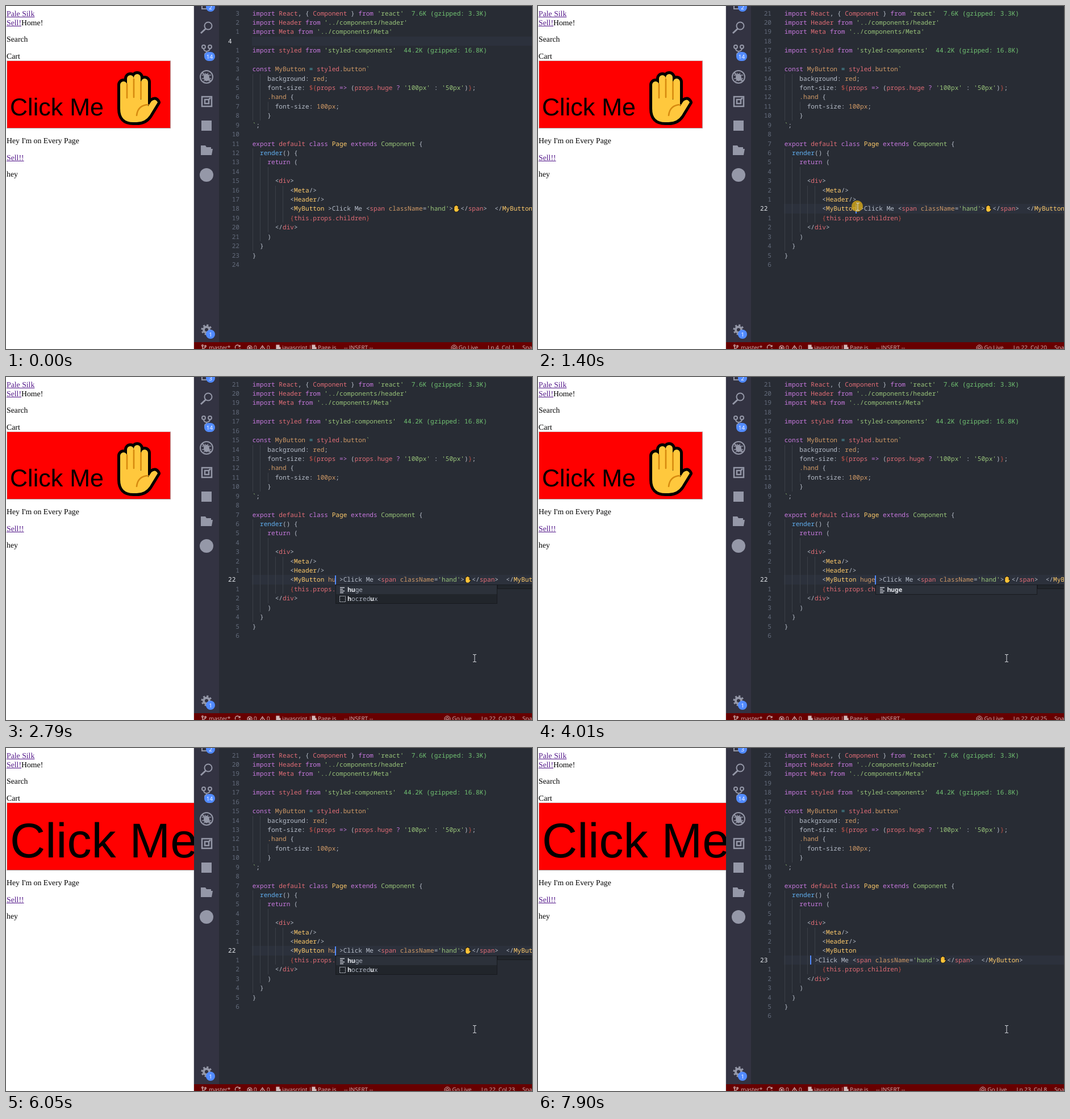
Recreate the animation shown at these times as an HTML page. Size 926x605 px, loop 8 s.

```html
<!DOCTYPE html>
<html lang="en">
<head>
<meta charset="utf-8">
<title>Styled button demo</title>
<style>
html, body { margin: 0; width: 100%; height: 100%; overflow: hidden; background: #282c34; }
body { position: relative; text-rendering: geometricPrecision; }
body > *, #page > *, #status > * { position: absolute; white-space: pre; }

#page { left: 0; top: 0; width: 331px; height: 605px; overflow: hidden; background: linear-gradient(90deg, #fff 329px, #e8e8ea 330px); font: 13.78px/16px "Liberation Serif", serif; color: #000; }
#page > * { left: 1px; }
u { color: #551a8b; }
#button { top: 96px; width: 287px; height: 118px; border: 1px solid; border-color: #d0c4c4 #a99 #a99 #d0c4c4; background: red; }
#button svg { position: absolute; left: 0; top: 0; width: 100%; height: 100%; }
#label { font-family: "Liberation Sans", Arial, sans-serif; }

#side { left: 331px; top: 0; }
.badge { font: 10px "Open Sans", sans-serif; fill: #fff; text-anchor: middle; }

#code, #pop { font: 500 11.11px/16.43px "Noto Sans Mono", monospace; }
#code { left: 375px; top: 4.6px; width: 551px; height: 588px; overflow: hidden; color: #b6bdc9; }
.row { position: relative; height: 16.43px; padding-left: 58.7px; }
.row.now::before { content: ""; position: absolute; left: 58px; right: 0; top: 0; bottom: 0; background: #2c313c; }
.row span { position: relative; top: 1px; }
.row .num { position: absolute; right: 515px; color: #636b7b; }
.now .num { right: auto; left: 16px; color: #e4e7ec; }
.row .guide { top: 0; display: inline-block; height: 100%; vertical-align: top; background: repeating-linear-gradient(90deg, #3b4048 0 1px, transparent 1px 13.333px); }
.row svg { position: relative; top: 1px; display: inline-block; width: 13.333px; height: 12.5px; vertical-align: -2px; }
.p { color: #c678dd } .r { color: #e06c75 } .g { color: #98c379 } .s { color: #72c472 }
.o { color: #d19a66 } .y { color: #ffcb6b } .b { color: #be5046 } .u { color: #61afef } .c { color: #56b6c2 }
.row .hl { background: #3e4451; }
#caret { top: 0; width: 2px; height: 16px; background: #528bff; }

#pop { top: 366px; width: 283px; background: #21252b; border: 1px solid #181a1f; color: #abb2bf; }
#pop div { position: relative; height: 16px; line-height: 17px; padding-left: 20px; }
#pop div:first-child { background: #2c313a; }
#pop b { color: #e6e9ef; }
#pop svg { position: absolute; left: 5px; top: 2px; }
#pop i { position: absolute; left: 284px; top: -1px; width: 400px; height: 6px; background: #21252b; border: 1px solid #181a1f; }

#status { left: 331px; top: 593px; width: 595px; height: 12px; overflow: hidden; background: #680000; color: #d2b9b9; font: 10px/16px "Open Sans", sans-serif; }
#status > * { top: 1px; }
#status svg { left: 1px; top: -1px; }
#right { right: 30px; display: flex; }
#right svg { position: static; margin: 3px 2px 0 0; }
#live { margin-right: 17px; }
#mouse { left: -15px; top: -15px; }
</style>
</head>
<body>
<svg width="0" height="0">
  <defs>
    <path id="fingers" d="M11 24V60M23 13V60M35 11V60M48 19V60" fill="none" stroke-linecap="round"/>
    <path id="palm" d="M5 50H54V62L60 53Q67 47 71 55L57 78Q49 90 34 90H28Q5 90 5 66Z" stroke-linejoin="round"/>
    <symbol id="hand" viewBox="0 0 76 95">
      <use href="#fingers" stroke="#000" stroke-width="22"/>
      <use href="#palm" stroke="#000" stroke-width="10"/>
      <use href="#fingers" stroke="#ffc83d" stroke-width="12"/>
      <use href="#palm" fill="#ffc83d"/>
      <path d="M17 23V47M29 14V46M41.5 19V48M54 59Q36 60 34 78" fill="none" stroke="#d68a10" stroke-width="2.6" stroke-linecap="round"/>
    </symbol>
  </defs>
</svg>

<div id="page">
  <u style="top:6px">Pale Silk</u>
  <span style="top:22px"><u>Sell!</u>Home!</span>
  <span style="top:51px">Search</span>
  <span style="top:81px">Cart</span>
  <div id="button"><svg><text id="label" x="5" y="96">Click Me</text><use id="wave" href="#hand" x="194" y="18" width="76" height="95"/></svg></div>
  <span style="top:230px">Hey I'm on Every Page</span>
  <u style="top:260px">Sell!!</u>
  <span style="top:289px">hey</span>
</div>

<svg id="side" width="44" height="593" viewBox="-1 0 44 593" fill="none" stroke="#9598a8" stroke-width="2">
  <rect x="-1" width="44" height="593" fill="#333342" stroke="none"/>
  <path d="M13 0V5H24V0"/>
  <circle cx="24" cy="35" r="6.5"/><path d="M19.500 40L11 48" stroke-width="3"/>
  <circle cx="16" cy="72" r="3"/><circle cx="27" cy="72" r="3"/><circle cx="21" cy="86" r="3"/>
  <path d="M16 75Q16 79 21 80V83M27 75Q27 79 21 80"/>
  <circle cx="21" cy="125" r="11"/>
  <ellipse cx="21" cy="126" rx="4" ry="5.500" fill="#9598a8"/>
  <path d="M13 122H29M13 128H29M16 133L18 130M26 133L24 130M18 118L20 121M24 118L22 121" stroke-width="1.300"/>
  <path d="M13 117L29 133"/>
  <path d="M13 160H30V177H13Z" stroke-width="2.500"/>
  <path d="M18 165H25V172H18ZM25 165L28 162" stroke-width="2.500"/>
  <g fill="#9598a8" stroke="none">
    <rect x="12" y="202" width="18" height="18"/>
    <path d="M11 246H19L21 249H29V252H32L30 263H11Z"/>
    <circle cx="21" cy="298" r="12"/>
  </g>
  <circle cx="21" cy="571" r="5" stroke-width="4"/>
  <circle cx="21" cy="571" r="8" stroke-width="3" stroke-dasharray="3.140 3.140"/>
  <g class="badge" stroke="none">
    <circle cx="28" cy="2" r="8" fill="#528bff"/><text id="unsaved" x="28" y="6">2</text>
    <g id="changes"><rect x="17" y="81" width="19" height="16" rx="8" fill="#528bff"/><text x="26.500" y="93">14</text></g>
    <g id="clock"><circle cx="28" cy="89" r="8" fill="#528bff"/><circle cx="28" cy="89" r="4.500" fill="none" stroke="#fff" stroke-width="1.300"/><path d="M28 86V89.500H31" fill="none" stroke="#fff"/></g>
    <circle cx="28" cy="579" r="8" fill="#528bff"/><text x="28" y="583">1</text>
  </g>
</svg>

<div id="code"></div>
<div id="caret"></div>
<div id="pop"></div>

<div id="status">
  <svg width="300" height="14" fill="none" stroke="#d2b9b9" stroke-width="1.200">
    <circle cx="14" cy="7" r="1.400"/><circle cx="19" cy="8" r="1.400"/><path d="M14 8V13M19 9Q19 12 14 12"/>
    <path d="M72 12A4 4 0 0 1 79 8M80 6V9H77M80 12A4 4 0 0 1 76 15"/>
    <circle cx="97" cy="11" r="4"/><path d="M95 9L99 13M99 9L95 13"/>
    <path d="M115 14L119.500 7L124 14M119.500 9.500V12.500"/>
    <path d="M144 6H149V10H151V14H144ZM207 6H212V10H214V14H207Z" fill="#d2b9b9"/>
  </svg>
  <span style="left:26px">master*</span>
  <span style="left:105px">0</span>
  <span style="left:128px">0</span>
  <span style="left:155px">javascript</span>
  <span style="left:202px">|</span>
  <span style="left:218px">Page.js</span>
  <span style="left:264px">-- INSERT --</span>
  <div id="right"><svg width="12" height="13" fill="none" stroke="#d2b9b9"><circle cx="6" cy="6" r="5"/><circle cx="6" cy="6" r="2.500"/><path d="M6 6V12"/></svg><span id="live">Go Live</span><span id="where"></span></div>
  <span style="left:578px">Spaces: 2</span>
</div>

<svg id="mouse" width="30" height="30">
  <circle id="click" cx="14" cy="14" r="10" fill="#d8aa18" opacity=".8"/>
  <path d="M12 8.500H14Q15 8.500 15 9.500Q15 8.500 16 8.500H18M15 9V21M12 21.500H14Q15 21.500 15 20.500Q15 21.500 16 21.500H18" fill="none" stroke="#d5d8dd"/>
</svg>

<script>
const $ = id => document.getElementById(id);
const CH = 6.667, ROW = 16.43, LEFT = 433.7;

// Tokens are split by "~"; the first letter of each is its colour class.
const head = "          w<~yMyButton";
const tail = ">Click Me <~rspan ~oclassName~w=~g'hand'~w>~h~w</~rspan~w>  </~yMyButton~w>";
const before = [
  "pimport ~rReact~w, { ~rComponent~w } ~pfrom ~g'react'  ~s7.6K (gzipped: 3.3K)",
  "pimport ~rHeader ~pfrom ~g'../components/header'",
  "pimport ~rMeta ~pfrom ~g'../components/Meta'",
  "",
  "pimport ~rstyled ~pfrom ~g'styled-components'  ~s44.2K (gzipped: 16.8K)",
  "",
  "pconst ~oMyButton~c = ~rstyled~w.~obutton~g`",
  "    wbackground: ~ored~w;",
  "    wfont-size: ~b${~rprops ~p=> ~w(~rprops.huge ~p? ~g'100px' ~w: ~g'50px'~w)~b}~w;",
  "    o.hand ~w{",
  "      wfont-size: ~o100px~w;",
  "    w}",
  "g`~w;",
  "",
  "pexport ~rdefault ~pclass ~yPage ~pextends ~gComponent ~w{",
  "  urender~w() {",
  "    preturn ~w(",
  "      ",
  "      w<~rdiv~w>",
  "          w<~yMeta~w/>",
  "          w<~yHeader~w/>"
];
const after = ["          b{~rthis.props.children~b}", "      w</~rdiv~w>", "    w)", "  w}", "w}", ""];

// [time, line, column]
const moves = [
  [0, 4, 1], [1350, 22, 20], [2330, 22, 21], [2560, 22, 22], [2700, 22, 23], [2920, 22, 24], [3050, 22, 25],
  [5870, 22, 24], [6050, 22, 23], [6110, 22, 22], [6170, 22, 21],
  [6990, 23, 11], [7630, 23, 10], [7770, 23, 9], [7900, 23, 8]
];
const caretOff = [[0, 1350], [1820, 2330], [3520, 4010], [4520, 5080], [5490, 5870], [6810, 6990], [7500, 7630]];
const unsaved = [[2630, 3930], [6110, 8000]];
const during = (spans, t) => spans.some(([a, b]) => t >= a && t < b);

// [start, end, x0, y0, x1, y1]
const glides = [[160, 950, 786, 552, 583, 355], [1040, 1160, 583, 355, 563, 354], [1430, 1640, 563, 354, 825, 496]];

function add(parent, cls, text = "") {
  const el = document.createElement("span");
  el.className = cls;
  el.textContent = text;
  parent.append(el);
}

function drawCode(line, col, marked) {
  const call = line === 23
    ? [head, " ".repeat(col) + "w" + tail]
    : [head + "~o" + " huge".slice(0, Math.max(0, col - 20)) + "~w " + tail];
  const rows = [...before, ...call, ...after].map((source, i) => {
    const row = document.createElement("div");
    const here = i + 1 === line;
    row.className = here ? "row now" : "row";
    add(row, "num", here ? line : Math.abs(i + 1 - line));
    const body = source.trimStart();
    add(row, "guide", source.slice(0, source.length - body.length));
    for (const token of body ? body.split("~") : []) {
      const kind = token[0], text = token.slice(1);
      if (kind === "h") row.insertAdjacentHTML("beforeend", '<svg><use href="#hand"/></svg>');
      else add(row, kind + (marked && text === "MyButton" ? " hl" : ""), text);
    }
    return row;
  });
  $("code").replaceChildren(...rows);
}

function drawPopup(line, col) {
  const word = line === 22 ? "huge".slice(0, Math.max(0, col - 21)) : "";
  const icon = d => `<svg width="14" height="13" fill="none" stroke="#c5c9d2">${d}</svg>`;
  const lines = icon('<path d="M2 2.500H10M2 5.500H7M2 8.500H10M2 11.500H8" stroke-width="1.500"/>');
  const box = icon('<rect x="1.500" y="1.500" width="10" height="10" stroke-dasharray="2 1"/>');
  const other = word === "h" ? "<b>h</b>ocredux" : "<b>h</b>ocred<b>u</b>x";
  $("pop").hidden = !word;
  $("pop").style.left = LEFT + (col - 1) * CH + "px";
  $("pop").innerHTML = `<div>${lines}<b>${word}</b>${"huge".slice(word.length)}</div>` +
    (word.length < 3 ? `<div>${box}${other}</div>` : "") + "<i></i>";
}

function drawMouse(t) {
  const glide = glides.filter(g => t >= g[0]).pop();
  $("mouse").style.visibility = glide ? "visible" : "hidden";
  if (!glide) return;
  const [a, b, x0, y0, x1, y1] = glide;
  const u = Math.min(1, (t - a) / (b - a)), e = u * u * (3 - 2 * u);
  $("mouse").style.transform = `translate(${Math.round(x0 + (x1 - x0) * e)}px, ${Math.round(y0 + (y1 - y0) * e)}px)`;
  $("click").style.display = t >= 1350 && t < 1460 ? "" : "none";
}

let last = "";
function frame() {
  const t = performance.now() % 8000;
  const [, line, col] = moves.filter(m => t >= m[0]).pop();
  const marked = during([[1640, 2330]], t);
  const key = [line, col, marked].join();
  if (key !== last) {
    last = key;
    drawCode(line, col, marked);
    drawPopup(line, col);
    $("where").textContent = `Ln ${line}, Col ${col}`;
    $("caret").style.transform = `translate(${Math.floor(LEFT + (col - 1) * CH - 0.7)}px, ${Math.round(4.6 + (line - 1) * ROW)}px)`;
  }
  $("caret").style.visibility = during(caretOff, t) ? "hidden" : "visible";
  $("unsaved").textContent = during(unsaved, t) ? 3 : 2;
  const busy = during([[6240, 7900]], t);
  $("clock").style.display = busy ? "" : "none";
  $("changes").style.display = busy ? "none" : "";
  const huge = t >= 4980;
  $("button").style.width = huge ? "460px" : "287px";
  $("wave").style.display = huge ? "none" : "";
  $("label").style.fontSize = huge ? "86.1px" : "43.06px";
  drawMouse(t);
  requestAnimationFrame(frame);
}
frame();
</script>
</body>
</html>
```
